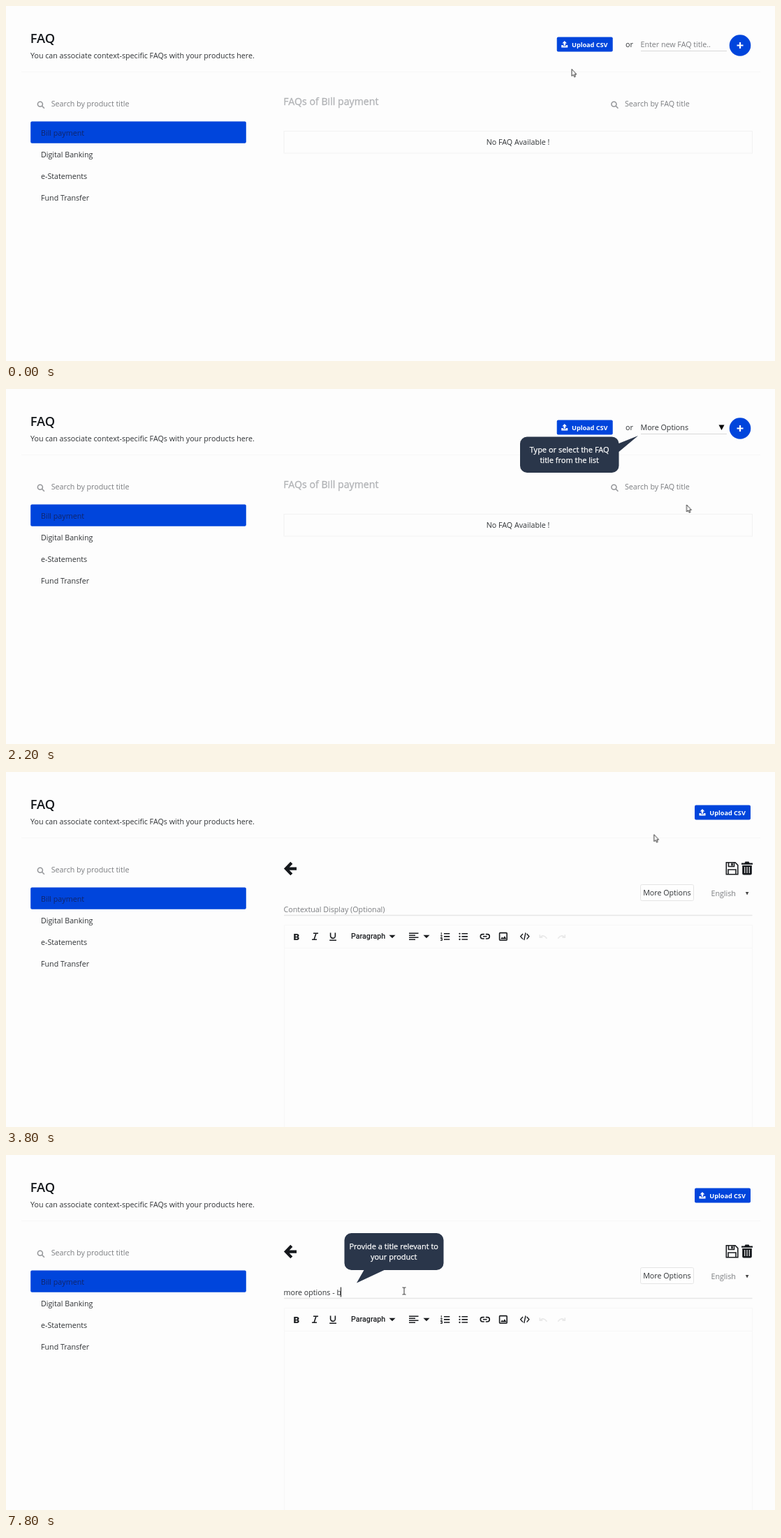
An HTML page that plays this animation: 1101 px wide and 509 px high, repeating every 8000 ms.

```html
<!DOCTYPE html>
<html lang="en">
<head>
<meta charset="utf-8">
<title>FAQ editor</title>
<style>
html, body { margin: 0; width: 100%; height: 100%; overflow: hidden; background: #fdfdfd; }
svg { display: block; width: 1101px; height: 509px; }
text { font: 10.7px "Open Sans", sans-serif; fill: #2f3235; white-space: pre; }
.title { font-size: 18.3px; font-weight: 600; fill: #15181c; }
.sub { font-size: 14.15px; fill: #b0b2b5; stroke: #b0b2b5; stroke-width: .3; }
.hint { fill: #7b7d80; }
.btn { font-size: 9.13px; font-weight: 700; fill: #fff; }
.opt { font-size: 9.3px; font-weight: 600; fill: #222; }
.note text { font-size: 11px; fill: #fff; stroke: #fff; stroke-width: .25; text-anchor: middle; }
.note path { fill: #2a364a; }
.mid { text-anchor: middle; }
.blue { fill: #0045dc; }
.faint { fill: none; stroke: #f7f7f7; }
.line { fill: none; stroke: #1b1d20; stroke-width: 1.6; }
.pale { fill: none; stroke: #e8e8e8; stroke-width: 1.6; }

/* One loop is 8 s; the picture changes at most every 200 ms (2.5%). */
.anim { animation: 8s step-end infinite; }
#list { animation-name: list; }
#editor { animation-name: editor; }
#drop { animation-name: drop; }
#row { animation-name: row; }
#chevron { animation-name: chevron; }
#ask { animation-name: ask; }
#picked { animation-name: picked; }
#hot { animation-name: hot; }
#ring { animation-name: ring; }
#note1 { animation-name: note1; }
#note2 { animation-name: note2; }
#pointer { animation-name: pointer; }
#cursor { animation-name: move; }
#arrow { animation-name: arrow; }
#beam { animation-name: beam; }
#hand { animation-name: hand; }

@keyframes list { 0% { opacity: 1 } 45%, 100% { opacity: 0 } }
@keyframes editor { 0% { opacity: 0 } 45%, 100% { opacity: 1 } }
@keyframes drop { 0% { opacity: 0 } 12.5% { opacity: 1 } 27.5%, 100% { opacity: 0 } }
@keyframes row {
  0% { opacity: 0; transform: translateY(-54.8px) }
  17.5% { opacity: 1; transform: translateY(-54.8px) }
  20% { opacity: 1; transform: translateY(-27.4px) }
  22.5% { opacity: 1; transform: none }
  25%, 100% { opacity: 1; transform: translateY(27.4px) }
}
@keyframes chevron { 0% { opacity: 0 } 10% { opacity: 1 } 42.5%, 100% { opacity: 0 } }
@keyframes ask { 0% { opacity: 1 } 27.5%, 100% { opacity: 0 } }
@keyframes picked { 0% { opacity: 0 } 27.5%, 100% { opacity: 1 } }
@keyframes hot { 0% { opacity: 0 } 32.5%, 100% { opacity: 1 } }
@keyframes ring { 0% { opacity: 0 } 42.5%, 100% { opacity: 1 } }
@keyframes note1 {
  0% { opacity: 0 }
  12.5% { opacity: 0; animation-timing-function: steps(2) }
  17.5% { opacity: 1 }
  37.5% { opacity: 1; animation-timing-function: steps(2) }
  42.5%, 100% { opacity: 0 }
}
@keyframes note2 {
  0% { opacity: 0 }
  80% { opacity: 0; animation-timing-function: steps(3) }
  87.5%, 100% { opacity: 1 }
}
@keyframes pointer {
  0% { opacity: 0; transform: translateY(50px) }
  32.5% { opacity: .4; transform: translateY(45px) }
  35% { opacity: .78; transform: translateY(33.5px); animation-timing-function: steps(2) }
  40% { opacity: 1; transform: none }
  45% { opacity: .5; transform: none }
  47.5%, 100% { opacity: 0; transform: none }
}
@keyframes move {
  0% { transform: translate(810px, 90.5px); animation-timing-function: steps(4) }
  10% { transform: translate(970px, 56px) }
  15% { transform: translate(970px, 56px); animation-timing-function: steps(3) }
  22.5% { transform: translate(974.5px, 142px) }
  25% { transform: translate(974.5px, 166px) }
  27.5% { transform: translate(974.5px, 166px); animation-timing-function: steps(2) }
  32.5% { transform: translate(1047px, 54.5px) }
  45% { transform: translate(1047px, 54.5px); animation-timing-function: steps(4) }
  55%, 100% { transform: translate(570px, 195px) }
}
@keyframes arrow {
  0% { opacity: 1 } 10% { opacity: 0 } 17.5% { opacity: 1 }
  32.5% { opacity: 0 } 45% { opacity: 1 } 55%, 100% { opacity: 0 }
}
@keyframes beam {
  0% { opacity: 0 } 10% { opacity: 1 } 17.5% { opacity: 0 } 55%, 100% { opacity: 1 }
}
@keyframes hand { 0% { opacity: 0 } 32.5% { opacity: 1 } 45%, 100% { opacity: 0 } }
</style>
</head>
<body>
<svg viewBox="0 0 1101 509">
  <defs>
    <g id="upload">
      <rect class="blue" width="80" height="21" rx="2"/>
      <path fill="#fff" d="M11 5.5l3.3 3.6h-2.1v3.2H9.8V9.1H7.7zM6.5 11.6h2.4v1.5h4.2v-1.5h2.4v3.5h-9z"/>
      <text class="btn" x="21.3" y="14">Upload CSV</text>
    </g>
    <g id="search" fill="none" stroke="#95979a" stroke-width="1.6">
      <circle cx="4.2" cy="4.2" r="3.5"/>
      <path d="M6.8 6.8l3.4 3.4"/>
    </g>
    <filter id="shadow" x="-10%" y="-10%" width="120%" height="120%">
      <feDropShadow dx="0" dy="1" stdDeviation="1.3" flood-opacity=".22"/>
    </filter>
  </defs>

  <text class="title" x="34.7" y="53">FAQ</text>
  <text x="35" y="75">You can associate context-specific FAQs with your products here.</text>
  <path class="faint" d="M22 94.5H1080"/>

  <use href="#search" x="44.7" y="136.5"/>
  <text class="hint" x="64.7" y="144.3">Search by product title</text>
  <rect class="blue" x="35.2" y="165.5" width="308.6" height="31.2" rx="2"/>
  <text x="50" y="185.7" style="fill:#10256a">Bill payment</text>
  <text x="50" y="216.7">Digital Banking</text>
  <text x="50" y="247.7">e-Statements</text>
  <text x="50" y="278.7">Fund Transfer</text>

  <g id="list" class="anim">
    <use href="#upload" x="788.7" y="44.5"/>
    <text x="887" y="59.3">or</text>
    <text id="ask" class="anim hint" x="908.5" y="59.3">Enter new FAQ title..</text>
    <text id="picked" class="anim" x="908.5" y="59.3">More Options</text>
    <path d="M909 64.5h123" stroke="#d8d8d8"/>
    <path id="chevron" class="anim" d="M1020.5 51.5h8l-4 7.5z"/>
    <circle class="blue" cx="1051" cy="56.5" r="15.3"/>
    <circle id="hot" class="anim" cx="1051" cy="56.5" r="15.3" fill="#0031a6"/>
    <circle id="ring" class="anim" cx="1051" cy="56.5" r="16" fill="none" stroke="#a5bbec" stroke-width="2"/>
    <path d="M1046.5 56.5h9M1051 52v9" stroke="#fff" stroke-width="2.2"/>

    <text class="sub" x="397.3" y="142.3">FAQs of Bill payment</text>
    <use href="#search" x="866.2" y="136.5"/>
    <text class="hint" x="886" y="144.3">Search by FAQ title</text>
    <rect x="398" y="179.5" width="670.5" height="31.5" fill="none" stroke="#f2f2f2"/>
    <text class="mid" x="733" y="199">No FAQ Available !</text>

    <g id="drop" class="anim">
      <rect x="909" y="64.5" width="146" height="149.5" fill="#fefefe" filter="url(#shadow)"/>
      <rect id="row" class="anim" x="909" y="125.5" width="146" height="27.4" fill="#d4d4d4"/>
      <text class="opt" x="917.7" y="87.6">Affirm</text>
      <text class="opt" x="917.7" y="115">Deny</text>
      <text class="opt" x="917.7" y="142.4">Disconnect</text>
      <text class="opt" x="917.7" y="169.8">More Options</text>
      <text class="opt" x="917.7" y="197.2">Live Agent Request</text>
    </g>
    <g id="note1" class="anim note">
      <path d="M746 68.5h121.5a10 10 0 0 1 10 9.5L905 67 877.5 90v20a10 10 0 0 1-10 10H746a10 10 0 0 1-10-10V78.5a10 10 0 0 1 10-10z"/>
      <text x="806.7" y="91.2">Type or select the FAQ</text>
      <text x="806.7" y="106">title from the list</text>
    </g>
  </g>

  <g id="editor" class="anim">
    <use href="#upload" x="986" y="47.5"/>
    <path d="M408.8 130.3l-8 8.3 8 8.3M402 138.6h14" fill="none" stroke="#15181c" stroke-width="4.2"/>
    <g class="line">
      <path d="M1031.3 129.8h12.7l3.8 3.8v13.1h-16.5zM1034.5 130v5.500h8v-5.500M1034 146.5v-6.500h11v6.500"/>
      <path d="M1039.5 130.5v4" stroke-width="2.5"/>
    </g>
    <path fill="#15181c" d="M1053 130.5h4.5l1-2h5l1 2h4.5v2.300h-16zM1054.2 134h13.6v11.500q0 2-2 2h-9.600q-2 0-2-2z"/>
    <path d="M1057.7 136v9M1061 136v9M1064.3 136v9" stroke="#fdfdfd" stroke-width="1.1"/>
    <rect x="908.5" y="161.5" width="76" height="23" rx="2" fill="#fefefe" stroke="#e4e4e4"/>
    <text x="912.2" y="177.3">More Options</text>
    <text class="hint" x="1009.5" y="178.3">English</text>
    <path d="M1058.8 172h4.600l-2.300 4.600z" fill="#444"/>

    <text id="label" class="hint" x="397.5" y="201">Contextual Display (Optional)</text>
    <text id="typed" x="397.5" y="201"></text>
    <path id="caret" d="M0 189.5v14" stroke="#111" visibility="hidden"/>
    <path d="M398 205.5h670.5" stroke="#e6e6e6" stroke-width="1.4"/>

    <path class="faint" d="M398.5 509V219.5h670V509M398.5 252.5h670"/>
    <text x="411.6" y="240.6" style="font:900 13.5px Roboto,sans-serif;fill:#1b1d20">B</text>
    <path class="line" d="M440 231.3h7M438 240.3h7M444 231.3l-3 9"/>
    <path class="line" d="M464.6 230.5v4.500a3.400 3.400 0 0 0 6.800 0v-4.500M463.2 241.3h9.800"/>
    <text x="494" y="239.2" style="font:500 10.65px Roboto,sans-serif;fill:#1b1d20">Paragraph</text>
    <path fill="#1b1d20" d="M548.5 233.8h9l-4.500 4.500zM597.5 233.8h9l-4.500 4.500z"/>
    <path class="line" d="M577 231.3h13.500M577 234.3h9M577 237.3h13.500M577 240.3h9"/>
    <path class="line" d="M627 231.8h8.300M627 235.9h8.300M627 240h8.300M652.5 231.8h8.500M652.5 235.9h8.500M652.5 240h8.500"/>
    <path class="line" d="M623.3 230v3.500M622 234.5h2.500l-2 2.800h2.200M622 238.5h2.500v3h-2.500M624.5 240h-2" style="stroke-width:.9"/>
    <path d="M649.5 231.8h.01M649.5 235.9h.01M649.5 240h.01" stroke="#1b1d20" stroke-width="2.3" stroke-linecap="round"/>
    <path class="line" d="M684.8 232.6h-2.300a3.200 3.200 0 0 0 0 6.400h2.300M686.8 232.6h2.300a3.200 3.200 0 0 1 0 6.400h-2.300M683 235.8h5.600"/>
    <rect class="line" x="706.6" y="230.6" width="10.6" height="10.6" rx="1"/>
    <path fill="#1b1d20" d="M708 239.5l2.300-3 1.500 1.700 2.100-2.900 2.700 4.200z"/>
    <path class="line" d="M740 232l-3.300 3.800 3.300 3.800M745.6 232l3.300 3.800-3.300 3.800M744 230.5l-2.300 10.500" style="stroke-width:1.4"/>
    <path class="pale" d="M764.3 233.3v4h4M764.8 237q5-5 9.500 1.800M800.3 233.3v4h-4M799.8 237q-5-5-9.500 1.800"/>

    <g id="note2" class="anim note">
      <path d="M494.5 112h122a10 10 0 0 1 10 10v33a10 10 0 0 1-10 10H541.5L502 183.5 512.5 165h-18a10 10 0 0 1-10-10V122a10 10 0 0 1 10-10z"/>
      <text x="555.2" y="135.2">Provide a title relevant to</text>
      <text x="555.2" y="150.2">your product</text>
    </g>
  </g>

  <path id="pointer" class="anim" fill="#0a6cff" d="M1053.5 77.5l12.500 12h-6.300l-6.200 36-6.200-36h-6.300z"/>

  <g id="cursor" class="anim" fill="#fff" stroke="#222" stroke-width=".9" stroke-linejoin="round">
    <path id="arrow" class="anim" d="M0 0V10L2.3 8 3.8 11.3 5.4 10.6 4 7.4H6.8z"/>
    <path id="beam" class="anim" fill="none" d="M-2.5-5h1.7q.8 0 .8.8V4.2q0 .8-.8.8h-1.7M2.5-5H.8Q0-5 0-4.2M2.5 5H.8Q0 5 0 4.2"/>
    <path id="hand" class="anim" d="M-1.2 1Q0-.8 1.2 1V5l4.3 1q1.5.5 1.2 2.500L5.7 13.8H-.5L-3.7 9Q-3.5 7-1.2 8.5z"/>
  </g>
</svg>
<script>
const byId = id => document.getElementById(id);
const label = byId('label'), typed = byId('typed'), caret = byId('caret');
const phrase = 'more options - b';
const LOOP = 8000, STEP = 200, TYPING = 5200;
// letters typed at each step once the field has focus
const counts = [0, 2, 3, 4, 6, 7, 8, 9, 10, 11, 12, 15, 15, 16];

function draw(now) {
  const count = counts[Math.floor((now % LOOP - TYPING) / STEP)];
  typed.textContent = phrase.slice(0, count || 0);
  label.setAttribute('visibility', count ? 'hidden' : 'inherit');
  caret.setAttribute('visibility', count === undefined ? 'hidden' : 'inherit');
  const x = Math.floor(397.5 + (count ? typed.getComputedTextLength() : 0)) + 0.5;
  caret.setAttribute('transform', `translate(${x})`);
  requestAnimationFrame(draw);
}
requestAnimationFrame(draw);
</script>
</body>
</html>
```
